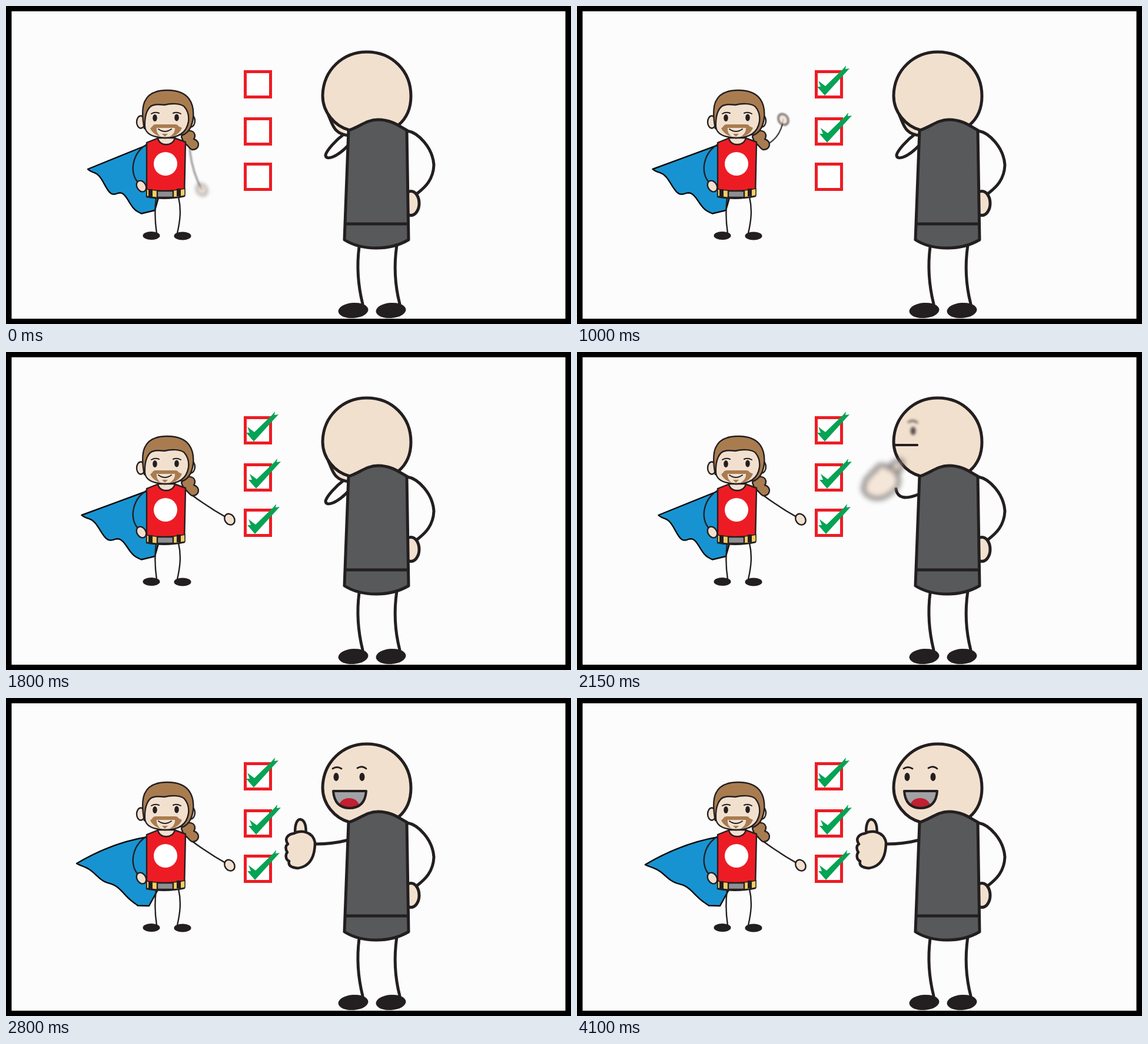
Write an HTML page that moves like this. It is 960 px wide and 540 px high and loops after 4150 ms.

```html
<!DOCTYPE html>
<html lang="en">
<head>
<meta charset="utf-8">
<title>Checklist hero</title>
<style>
html, body { margin: 0; width: 100%; height: 100%; overflow: hidden; background: #000; }
svg { display: block; }
.line { fill: none; }
.skin { fill: #f2e0cf; }
.hair { fill: #a97c50; }
.ink { fill: #231f20; stroke: none; }
</style>
</head>
<body>
<svg width="960" height="540" viewBox="0 0 960 540" stroke="#231f20" stroke-linecap="round" stroke-linejoin="round">
  <defs>
    <path id="head" d="M584 211C558 204 538 180 538 152C539 108 573 78 613 78C656 78 688 110 688 153C688 174 680 191 667 202L632 215Z"/>
    <clipPath id="headClip"><use href="#head"/></clipPath>
    <path id="grin" d="M556 158H612Q610 187 583 187Q558 186 556 158Z"/>
    <clipPath id="grinClip"><use href="#grin"/></clipPath>
  </defs>
  <rect x="9.5" y="9" width="941" height="522" fill="#fcfcfc" stroke="none"/>

  <g id="boxes" fill="#fff" stroke="#ed1c24" stroke-width="5" stroke-linejoin="miter"></g>

  <!-- hero -->
  <g stroke-width="2.4">
    <path id="cape" fill="#1893d1" stroke="#0b0b0b"/>
    <path class="line" d="M255 326C252 350 253 366 256 386M293 324C298 346 296 364 291 386"/>
    <ellipse class="ink" cx="247" cy="390" rx="14.5" ry="7"/>
    <ellipse class="ink" cx="300" cy="390.5" rx="14.5" ry="7"/>
    <path id="arm" class="line"/>
    <ellipse id="hand" class="skin" rx="8" ry="10"/>
    <path class="line" d="M239 235C213 251 210 284 224 299"/>
    <ellipse class="skin" cx="230" cy="306" rx="7.5" ry="10" transform="rotate(-32 230 306)"/>
    <path class="hair" d="M298 222C304 209 319 209 321 219C321 223 320 225 319 226C331 229 329 245 316 244C310 241 309 235 302 232Z"/>
    <path d="M239 232L259 224H286L305 231L303 323Q271 330 239 324Z" fill="#ed1c24"/>
    <path class="skin" d="M258 224C260 239 284 239 287 224Z"/>
    <path d="M239 311Q271 317 304 310V322Q271 329 239 323Z" fill="#f7cf62" stroke-width="1.5"/>
    <path class="ink" d="M242 311h7v13h-7zM290 310h7v13h-7z"/>
    <rect x="257" y="314" width="27" height="11" fill="#8d8f92"/>
    <circle cx="271" cy="268" r="20" fill="#fff" stroke="none"/>
    <ellipse class="skin" cx="229" cy="197" rx="7" ry="10.5"/>
    <ellipse class="skin" cx="314" cy="195" rx="7" ry="10.5"/>
    <path class="hair" d="M235 208C228 172 231 143 274 143C313 143 320 168 318 190C316 205 311 215 300 219Z"/>
    <path class="skin" d="M236 205C235 185 241 169 252 168C259 166 263 168 269 168C280 165 297 165 303 171C309 178 311 188 310 196C307 216 292 224 270 224C248 223 237 216 236 205Z"/>
    <path class="hair" stroke="none" d="M249 204Q250 201 255 201H287Q292 201 293 204L299 207Q295 217 284 221L278 222Q288 216 287 207H256Q255 216 263 222Q250 218 245 208ZM265 217H275L270 222Z"/>
    <path class="line" stroke-width="2" d="M259 209Q270 217 281 209M247 183Q253 179 260 182M284 182Q290 179 297 183"/>
    <ellipse class="ink" cx="253" cy="190" rx="3.8" ry="6"/>
    <ellipse class="ink" cx="290" cy="189.5" rx="3.8" ry="6"/>
  </g>

  <g id="checks" fill="#05a354" stroke="none"></g>

  <!-- onlooker -->
  <g stroke-width="5">
    <path class="line" d="M600 409C596 440 597 470 606 506M664 406C659 440 661 475 669 506"/>
    <ellipse class="ink" cx="590" cy="517" rx="25.5" ry="13" transform="rotate(-4 590 517)"/>
    <ellipse class="ink" cx="654" cy="517" rx="25.5" ry="13" transform="rotate(-4 654 517)"/>
    <g id="chin">
      <path d="M575 217C560 228 545 245 543 253C543 263 562 258 584 234" fill="#fcfcfc"/>
      <path class="skin" d="M548 186C555 200 556 218 584 220"/>
    </g>
    <use href="#head" class="skin"/>
    <g clip-path="url(#headClip)">
      <g id="face">
        <g id="eyes">
          <ellipse class="ink" cx="561" cy="134" rx="4.5" ry="7"/>
          <ellipse class="ink" cx="605" cy="134" rx="4.5" ry="7"/>
          <path class="line" stroke-width="2.8" d="M555 120Q562 115 570 120M597 119Q605 114 612 120"/>
        </g>
        <path id="flat" class="line" stroke-width="4" d="M556 158H612"/>
        <g id="mouth">
          <g clip-path="url(#grinClip)" stroke="none">
            <path d="M550 155h65v34h-65z" fill="#a0a2a4"/>
            <ellipse cx="583" cy="184" rx="17" ry="14" fill="#c21f30"/>
          </g>
          <use href="#grin" class="line" stroke-width="4"/>
        </g>
      </g>
    </g>
    <path id="reach" class="line"/>
    <g id="thumb" class="skin" stroke-width="4.5">
      <path d="M491 235C488 215 494 206 499 206C507 207 510 219 508 233"/>
      <path d="M488 230C500 224 520 226 524 245C524 270 515 286 495 289C484 288 478 285 480 277C473 274 474 265 477 262C473 256 474 250 478 248C472 240 476 232 488 230Z"/>
    </g>
    <path class="line" d="M682 212C700 215 725 240 727 270C726 295 712 308 699 318"/>
    <ellipse class="skin" cx="688" cy="335" rx="14" ry="20.5"/>
    <path d="M582 211C600 206 612 193 632 193C655 193 668 204 681 211L684 397Q660 411 629 411Q597 411 575 397Z" fill="#58595b"/>
    <path d="M577 370H683"/>
  </g>
</svg>
<script>
const LOOP = 4150, STEP = 50;
const { PI, sin, cos, min, max, hypot } = Math;
const $ = id => document.getElementById(id);
const set = (id, attrs) => { for (const k in attrs) $(id).setAttribute(k, attrs[k]); };
const show = (id, on) => set(id, { visibility: on ? 'visible' : 'hidden' });
const blur = (id, r) => { $(id).style.filter = r > 0.3 ? `blur(${r}px)` : 'none'; };
const ramp = (t, a, b) => min(1, max(0, (t - a) / (b - a)));
const ease = p => p * p * (3 - 2 * p);
const lerp = (a, b, p) => a + (b - a) * p;
const swing = (t, period) => cos(2 * PI * t / period);

// A gust lifts the cape; its hem is a straight line with a ripple.
function cape(t) {
  const gust = ease(ramp(t, 2400, 2800));
  const calm = swing(t, 700), wild = swing(t - 2800, 463);
  const x = lerp(133.5 + 5.5 * calm, 113.5 + 6.5 * wild, gust);
  const y = lerp(277, 284 - 3 * wild, gust);
  const endX = lerp(230, 224, gust), endY = 352.5;
  let hem = '';
  for (let u = 0; u <= 1; u += 1 / 32) {
    const wave = lerp(9, 3.5, gust) * sin(2 * PI * (1.9 * u - 0.54)) - 5 * gust;
    hem += `L${lerp(x, endX, u)} ${lerp(y, endY, u) + wave * sin(PI * u)}`;
  }
  const topX = (x + 240) / 2, topY = (y + 236) / 2 - 13 * gust;
  set('cape', { d: `M240 236Q${topX} ${topY} ${x} ${y}${hem}L${lerp(253, 243, gust)} ${lerp(347, 353, gust)}L260 322` });
}

// The arm swings up from the hip, then down past the boxes while it stretches out.
function armPose(t) {
  const up = sin(ramp(t, 0, 650) * PI / 2), down = ease(ramp(t, 850, 1500));
  const angle = (74 - 138 * up + 97 * down) * PI / 180;
  const reach = 75 - 14 * up + 20 * ramp(t, 1350, 1500);
  const dx = cos(angle), dy = sin(angle), sag = 3 + (81 - reach) * 0.8;
  return {
    x: 312 + reach * dx, y: 240 + reach * dy,
    bendX: 312 + reach / 2 * dx - sag * dy, bendY: 240 + reach / 2 * dy + sag * dx
  };
}

function heroArm(t) {
  const { x, y, bendX, bendY } = armPose(t);
  const next = armPose(t + 25);
  const speed = hypot(next.x - x, next.y - y) / 25;
  const opacity = 1 - min(0.4, speed);
  set('arm', { d: `M312 240Q${bendX} ${bendY} ${x} ${y}`, opacity });
  set('hand', { transform: `translate(${x} ${y}) rotate(-35)`, opacity });
  blur('arm', min(1.5, speed * 4));
  blur('hand', min(3, speed * 9));
}

function onlooker(t) {
  const p = ramp(t, 2050, 2300), moving = p < 1;
  show('chin', t < 2050);
  show('reach', t >= 2050);
  show('thumb', t >= 2050);
  const x = lerp(553, 525, p), y = lerp(222, 248, p);
  set('reach', { d: `M582 241Q${lerp(540, 555, p)} ${lerp(262, 248, p)} ${x} ${y}` });
  set('thumb', {
    transform: `translate(${x - 524} ${y - 248}) rotate(${70 * (1 - p)} 524 248)`,
    opacity: moving ? 0.75 : 1
  });
  blur('thumb', moving ? 5 : 0);

  const turn = ramp(t, 2000, 2260), open = ease(ramp(t, 2300, 2500));
  show('face', turn > 0);
  set('face', { transform: `translate(${80 * (turn - 1)} 0)` });
  set('eyes', { opacity: turn < 1 ? 0.75 : 1 });
  blur('eyes', turn < 1 ? 2 : 0);
  show('flat', turn > 0 && !open);
  show('mouth', open > 0);
  set('mouth', { transform: `translate(0 ${158 * (1 - open)}) scale(1 ${open})` });
}

const ITEMS = [[0, 0], [4, 80], [2, 157]];
$('boxes').innerHTML = ITEMS.map(([, y]) => `<rect x="406.5" y="${y + 111.5}" width="43" height="43"/>`).join('');
$('checks').innerHTML = ITEMS.map(([x, y], i) => `<clipPath id="wipe${i}"><rect id="edge${i}" x="400" y="95" height="65"/></clipPath>
  <g transform="translate(${x} ${y})"><path id="check${i}" clip-path="url(#wipe${i})"
  d="M410 127L422 136L452 107L457 101L456 107L463 106L421 152L408 137L414 137Z"/></g>`).join('');

function draw(t) {
  cape(t);
  heroArm(t);
  ITEMS.forEach((_, i) => {
    const p = ramp(t - 450 * i, 400, 550);
    set('edge' + i, { width: 70 * p });
    set('check' + i, { opacity: p });
  });
  onlooker(t);
}

function tick() {
  const t = Math.floor(performance.now() % LOOP / STEP) * STEP;
  draw(t < 100 ? 0 : t);
  requestAnimationFrame(tick);
}
tick();
</script>
</body>
</html>
```
